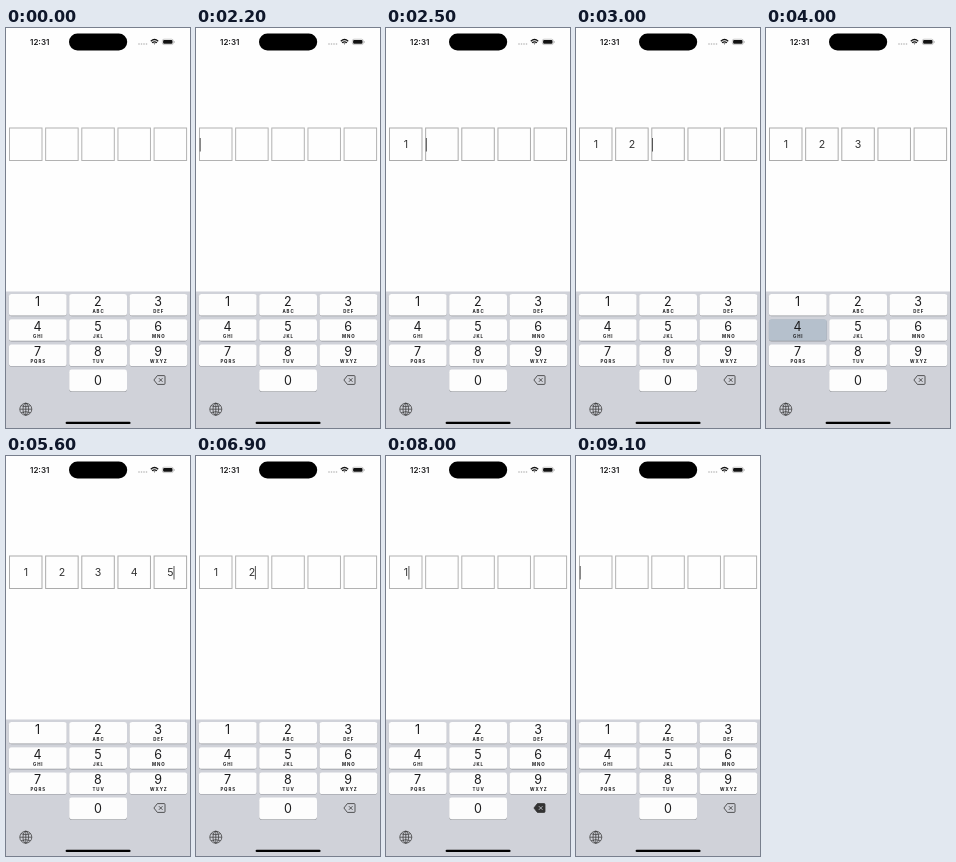
An HTML page for the animation above (9400 ms loop, 184 by 400 pixels).

```html
<!DOCTYPE html>
<html lang="en">
<head>
<meta charset="utf-8">
<title>Code entry</title>
<style>
  html, body { margin: 0; width: 100%; height: 100%; overflow: hidden; background: #fefefe; }
  svg { display: block; width: 184px; height: 400px; }
  text { font-family: Inter, "Liberation Sans", sans-serif; text-anchor: middle; fill: #1c1c1e; }
  .time { font-size: 8px; font-weight: 600; }
  .digit { font-size: 10.6px; fill: #333; }
  .num { font-size: 12.5px; }
  .letters { font-size: 4.4px; font-weight: 700; letter-spacing: .9px; }
</style>
</head>
<body>
<svg id="stage" viewBox="0 0 184 400">
  <rect width="184" height="400" fill="#fefefe"/>
  <text class="time" x="33.7" y="17">12:31</text>
  <rect x="63" y="5.6" width="58.2" height="17" rx="8.5"/>
  <g id="dots" fill="#b5b5b5"></g>
  <g fill="none" stroke="#111" stroke-width="1.3">
    <path d="M144.8 13.2Q148.5 9.9 152.2 13.2M146.1 14.8Q148.5 12.8 150.9 14.8"/>
    <path d="M147.5 15.6h2l-1 1z" fill="#111" stroke="none"/>
  </g>
  <rect x="156.3" y="11.2" width="11" height="5.4" rx="1.7" fill="none" stroke="#aaa" stroke-width=".6"/>
  <rect x="157.1" y="12" width="9.4" height="3.8" rx="1" fill="#111"/>
  <path d="M168.3 13v1.9" stroke="#aaa" stroke-width=".7"/>
  <g id="boxes" fill="none" stroke-width="1"></g>
  <rect id="caret" y="110" width="1" height="13.5" fill="#555"/>
  <rect y="263.5" width="184" height="136.5" fill="#d0d2d9"/>
  <g id="keys"></g>
  <path id="erase" d="M147.9 352L151.4 347.6H158.1Q159 347.6 159 348.5V355.5Q159 356.4 158.1 356.4H151.4Z"
        stroke="#333" stroke-width=".8" stroke-linejoin="round"/>
  <path id="cross" d="M152.9 350.2l3.6 3.6m0-3.6l-3.6 3.6" stroke-width=".8"/>
  <g fill="none" stroke="#333" stroke-width=".7">
    <circle cx="19.8" cy="381.2" r="6"/>
    <ellipse cx="19.8" cy="381.2" rx="2.8" ry="6"/>
    <path d="M19.8 375.2v12M13.8 381.2h12M15.2 377.8q4.6 1.8 9.2 0M15.2 384.6q4.6-1.8 9.2 0"/>
  </g>
  <rect x="59.6" y="393.8" width="65" height="2.3" rx="1.15"/>
</svg>
<script>
const LOOP = 9400, PITCH = 36.15;
const $ = id => document.getElementById(id);

function add(parent, tag, attrs, text = '') {
  const el = document.createElementNS('http://www.w3.org/2000/svg', tag);
  for (const k in attrs) el.setAttribute(k, attrs[k]);
  el.textContent = text;
  return parent.appendChild(el);
}

for (let i = 0; i < 4; i++) add($('dots'), 'circle', { cx: 133 + i * 2.5, cy: 16, r: .8 });

const digits = [];
for (let i = 0; i < 5; i++) {
  add($('boxes'), 'rect', { x: 3.5 + i * PITCH, y: 100, width: 32.5, height: 32.5 });
  digits.push(add($('stage'), 'text', { class: 'digit', x: 19.8 + i * PITCH, y: 120.3 }, i + 1));
}

const keys = {};
['', 'ABC', 'DEF', 'GHI', 'JKL', 'MNO', 'PQRS', 'TUV', 'WXYZ', null, ''].forEach((letters, i) => {
  if (letters === null) return;
  const num = (i + 1) % 11;
  const x = 2.9 + i % 3 * 60.3, y = 266 + Math.floor(i / 3) * 25.2;
  const size = { x, width: 57.8, height: 21.6, rx: 2.6 };
  add($('keys'), 'rect', { ...size, y: y + .6, fill: '#94969b' });
  keys[num] = add($('keys'), 'rect', { ...size, y });
  add($('keys'), 'text', { class: 'num', x: x + 28.7, y: y + (num ? 12 : 15.2) }, num);
  if (letters) add($('keys'), 'text', { class: 'letters', x: x + 29.3, y: y + 18.6 }, letters);
});

// [time, digits shown]
const edits = [[0, 0], [2400, 1], [3000, 2], [3500, 3], [4100, 4], [4600, 5],
  [5700, 4], [6400, 3], [6900, 2], [7600, 1], [8100, 0]];
// [key, down, up]
const presses = [[1, 2300, 2500], [2, 2800, 3000], [3, 3400, 3500], [4, 4000, 4200],
  [5, 4500, 4700], ['erase', 6300, 6400], ['erase', 7500, 7600], ['erase', 8000, 8100]];
// times at which the caret turns on and off
const blinks = [200, 700, 1200, 1700, 2200, 4000, 4100, 5100, 5600, 6300, 6400, 7500, 7600, 8600, 9100];

function caretX(count, erasing) {
  if (erasing && count) return count === 1 ? 22.4 : 58.9 + (count - 2) * PITCH;
  return count === 5 ? 167.5 : 3.7 + count * PITCH;
}

function draw(t) {
  const count = edits.filter(e => e[0] <= t).pop()[1];
  const pressed = presses.find(p => t >= p[1] && t < p[2])?.[0];
  digits.forEach((d, i) => d.setAttribute('visibility', i < count ? 'visible' : 'hidden'));
  $('boxes').setAttribute('stroke', t >= 2400 && t < 5700 ? '#ababab' : '#b2b2b2');
  $('caret').setAttribute('x', caretX(count, t >= 5700));
  $('caret').setAttribute('visibility', blinks.filter(b => b <= t).length % 2 ? 'visible' : 'hidden');
  for (const k in keys) keys[k].setAttribute('fill', k == pressed ? '#b5c0cc' : '#fdfdfd');
  const erase = pressed === 'erase';
  $('erase').setAttribute('fill', erase ? '#333' : 'none');
  $('cross').setAttribute('stroke', erase ? '#d0d2d9' : '#333');
}

const start = performance.now();
function tick() {
  draw((performance.now() - start) % LOOP);
  requestAnimationFrame(tick);
}
tick();
</script>
</body>
</html>
```
